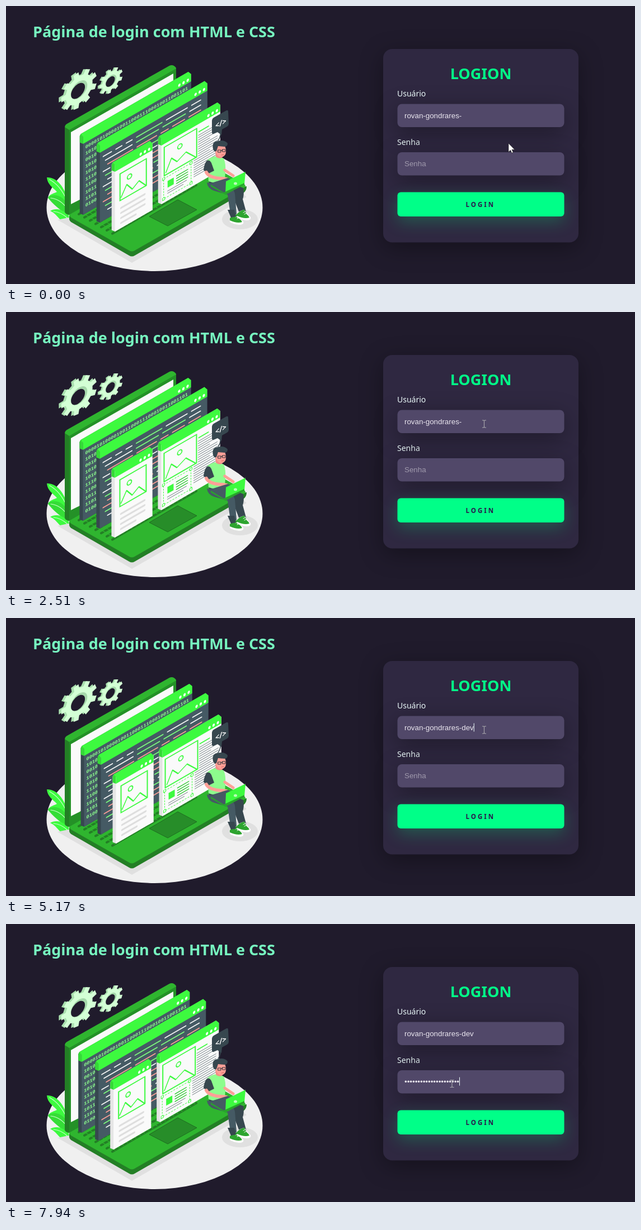
Animation of 1124x498 px, one loop 8000 ms. Source, as an HTML page:

```html
<!DOCTYPE html>
<html lang="pt-BR">
<head>
<meta charset="utf-8">
<title>Login</title>
<style>
html, body { margin: 0; width: 100%; height: 100%; overflow: hidden; background: #201b2c; }
svg { display: block; width: 1124px; height: 498px; }
.noto { font-family: "Noto Sans", sans-serif; }
.h { font-size: 27px; font-weight: 600; }
.label { font-size: 14px; fill: #f0ffff; }
.field { font: 13.333px "Liberation Sans", Arial, sans-serif; fill: #eae6ef; }
.btn { font-size: 11.5px; font-weight: 800; letter-spacing: 3px; fill: #2b134b; }
.bits { font: bold 8.5px "Liberation Mono", monospace; fill: #8dff8d; }
.card { filter: drop-shadow(0 10px 20px #00000056); }
.glow { filter: drop-shadow(0 10px 14px #00ff8038); }
</style>
</head>
<body>
<svg viewBox="0 0 1124 498">
  <rect width="1124" height="498" fill="#201b2c"/>
  <text class="noto h" x="48" y="56" fill="#77f7c0">Página de login com HTML e CSS</text>
  <g id="art"></g>

  <rect class="card" x="674" y="77" width="349" height="346.5" rx="16" fill="#2f2841"/>
  <text class="noto h" x="848.5" y="131" text-anchor="middle" fill="#00ff88">LOGION</text>
  <text class="noto label" x="699" y="162">Usuário</text>
  <text class="noto label" x="699" y="248.500">Senha</text>
  <g fill="#514869">
    <rect class="card" x="699.500" y="175.500" width="298" height="41.500" rx="8"/>
    <rect class="card" x="699.500" y="262" width="298" height="41.500" rx="8"/>
  </g>
  <rect class="glow" x="699.500" y="333.500" width="298" height="43.500" rx="6" fill="#00ff88"/>
  <text class="noto btn" x="821.500" y="359.500">LOGIN</text>
  <text class="field" id="user" x="712" y="201"></text>
  <text class="field" id="pass" x="712" y="287"></text>
  <rect id="caret" width="1" height="15" fill="#f0ffff"/>
  <circle id="click" r="10.5" fill="#b5a832"/>
  <g id="pointer">
    <path id="arrow" d="M0 0V15.500L3.500 12.200L5.800 17.300L8.200 16.200L6 11.200H10.800Z" fill="#fff" stroke="#222" stroke-width=".6"/>
    <path id="beam" d="M-3.500-6.500H-1L0-5.500L1-6.500H3.500M0-5.500V5.500M-3.500 6.500H-1L0 5.500L1 6.500H3.500" fill="none" stroke="#aaa9ae" stroke-width="1.100"/>
  </g>
</svg>
<script>
const $ = id => document.getElementById(id);
const GREEN = '#3dfa3f', MID = '#2fb52f', DEEP = '#237f25', SLATE = '#455a64', INK = '#37474f', SKIN = '#ff9f97';

let seed = 11;
const rand = () => (seed = seed * 16807 % 2147483647) / 2147483647;

const shape = (d, fill, more = '') => `<path d="${d}" fill="${fill}" ${more}/>`;
const line = (d, color, w = 1) => shape(d, 'none', `stroke="${color}" stroke-width="${w}" stroke-linecap="round" stroke-linejoin="round"`);
const iso = (x, y, inner) => `<g transform="matrix(1 -.58 0 1 ${x} ${y})">${inner}</g>`;
const bar = (x, y, w, color, h) => line(`M${x} ${y}h${w}`, color, h);

// Slab seen from the left, with a coloured title bar and three dots.
function pane(x, y, w, h, head, face, side, inner) {
  const slab = (top, tall, color) =>
    shape(`M-6-4.500L-4-7L${w - 5}-7L${w} 0V${top + tall}H0L-6 ${top + tall - 6}Z`, color);
  let dots = '';
  for (let i = 0; i < 3; i++)
    dots += `<ellipse cx="${w - 21 + i * 7.500}" cy="${head / 2 + 1}" rx="2.100" ry="2.600" fill="#fff"/>`;
  return iso(x, y,
    slab(0, h, side) + slab(0, head, '#35d937') +
    shape(`M0 0H${w}V${h}H0Z`, face) +
    shape(`M0 0L-4-7H${w - 5}L${w} 0V${head}H0Z`, GREEN) + dots + inner);
}

function picture(x, y, w, h, cx, hill) {
  return shape(`M${x} ${y}h${w}v${h}h${-w}Z`, 'none', `stroke="${GREEN}" stroke-width="2"`) +
    `<circle cx="${cx}" cy="${y + 14.500}" r="4" fill="none" stroke="${GREEN}" stroke-width="1.800"/>` +
    line(hill, GREEN, 1.800);
}

function gear(x, y, r) {
  const ring = [];
  for (let i = 0; i < 9; i++)
    [[-.27, .76], [-.2, 1], [.2, 1], [.27, .76]].forEach(([a, k]) => {
      const t = (i + a) * Math.PI * 2 / 9 + .35;
      ring.push((Math.cos(t) * r * k).toFixed(1) + ' ' + (Math.sin(t) * r * k).toFixed(1));
    });
  const body = 'M' + ring.join('L') + 'Z';
  return iso(x - r * .06, y, shape(body, '#a9dfae')) + iso(x + r * .08, y,
    shape(body, '#d3ffd5') + `<circle r="${r * .46}" fill="#a5d8aa"/>` +
    `<circle cx="${-r * .06}" cy="${r * .03}" r="${r * .39}" fill="#201b2c"/>`);
}

function bitsPane() {
  let rows = '';
  for (let i = 0; i < 10; i++) {
    let s = '';
    for (let j = 0; j < 36; j++) s += rand() < .5 ? 0 : 1;
    rows += `<text class="bits" x="4" y="${24 + i * 11.600}">${s}</text>`;
  }
  return pane(138, 234, 193, 140, 13, SLATE, '#37474f', rows);
}

function codePane() {
  const tones = ['#f5f5f5', '#7dff7d', SKIN];
  let rows = '';
  for (let i = 0; i < 12; i++) {
    let x = 6 + (i % 3) * 4;
    while (x < 172) {
      const w = 10 + rand() * 38;
      rows += bar(x, 23 + i * 9, Math.min(w, 180 - x), i === 2 || i > 4 && rand() < .5 ? SKIN : tones[rand() * 2 | 0], 2);
      x += w + 8;
    }
  }
  return pane(168, 250, 192, 138, 13, SLATE, '#37474f', rows);
}

function articlePane() {
  let rows = bar(67, 26, 17, GREEN, 2);
  for (let i = 0; i < 18; i++)
    rows += bar(i < 10 ? 66 : 58, 32 + i * 4.100, (i < 10 ? 34 : 42) * (i % 5 === 4 ? .6 : 1), '#6f7b80', 1);
  rows += shape('M4 74H53V110H4Z', 'none', `stroke="${GREEN}" stroke-dasharray="3 2"`);
  [[4, 74], [53, 74], [53, 110], [4, 110]].forEach(([x, y]) =>
    rows += shape(`M${x - 2} ${y - 2}h4v4h-4Z`, '#fff', `stroke="${GREEN}"`));
  rows += shape('M11 82h11v12h-11Z', GREEN);
  for (let i = 0; i < 4; i++) rows += bar(27, 82 + i * 4.500, 20, '#35c937', 1.600);
  rows += bar(11, 100, 34, '#6f7b80', 1) + bar(11, 104, 28, '#6f7b80', 1);
  return pane(278, 238, 105, 117, 12, '#fafafa', '#e3e3e3',
    picture(5, 18, 58, 51, 33, 'M8 65L18 45L28 57L44 49L61 68') + rows);
}

function cardPane() {
  let rows = '';
  for (let i = 0; i < 4; i++) rows += bar(11, 83 + i * 9, i === 3 ? 26 : 42, '#dedede', 3.500);
  return pane(195, 285, 67, 119, 12, '#fafafa', '#e6e6e6',
    picture(9, 21, 47, 48, 26, 'M11 64L21 47L31 61L43 53L55 68') + rows);
}

function laptop() {
  let keys = '';
  for (let i = 0; i < 7; i++) keys += line(`M${130 + i * 10} ${373 + i * 5.800}l150-87`, DEEP, 4);
  for (let i = 0; i < 22; i++) keys += line(`M${130 + i * 7.500} ${367 - i * 4.350}l65 38`, MID, 1.200);
  return shape('M92 383L225 460L430 342L400 320Z', '#e0e0e0') +
    shape('M113 372V382Q114 386 118 388L220 447Q225 450 230 447L424 335Q430 331 430 323Z', DEEP) +
    shape('M113 372Q112 376 118 380L220 438Q225 441 230 438L425 326Q431 322 424 318L318 258Z', MID) +
    keys +
    shape('M256 377L307 347L341 365L289 394Z', '#278d29', 'stroke="#1e6c20"') +
    shape('M105 218Q105 213 109 211L292 107Q299 104 304 111V264L114 374Q105 373 105 368Z', MID) +
    shape('M105 217L113 222V374Q105 373 105 368Z', DEEP) +
    shape('M113 222L304 112V264L113 374Z', '#249127') +
    shape('M116 226L299 121V262L116 355Z', '#fafafa');
}

const plant = () =>
  shape('M113 352C104 324 92 307 73 307C74 320 84 325 91 333C82 337 77 338 75 344C84 353 98 354 110 372L114 374Z', GREEN) +
  shape('M75 343C88 333 105 342 112 360V377C98 366 82 354 75 343Z', '#35dd37') +
  shape('M79 367C91 360 107 366 114 380L110 387C94 387 94 374 79 367Z', GREEN) +
  line('M78 311Q98 322 109 349M80 344Q98 346 110 364M85 368Q99 369 111 381', '#c9ffc9', 1.200);

const bubble = () =>
  line('M383 222Q385 233 379 241', INK, 1.500) +
  shape('M368 205Q368 202 371 200L394 187Q397 186 397 189L398 211Q398 214 395 216L386 221L385 231L378 226L371 229Q368 230 368 226Z', INK) +
  `<text class="noto" font-size="14" font-weight="700" fill="#fff" transform="matrix(.9 -.46 0 1 374 220)">&lt;/&gt;</text>`;

function shoe(x, y) {
  return `<g transform="translate(${x} ${y})">` +
    shape('M-9 0Q-3-5 4-6Q10 3 15 7Q17 13 7 13Q-2 12-9 8Z', '#fff') +
    shape('M-9 1Q-3-5 4-6L8 2Q12 5 13 8Q4 11-9 5Z', '#2da42f') +
    line('M2-1l4-2M4 2l4-2', '#fff') + '</g>';
}

const man = () =>
  `<ellipse cx="418" cy="382" rx="32" ry="18" fill="#e0e0e0"/>` +
  shape('M362 311L396 315L424 326Q426 338 423 346L430 372L419 376L405 340L364 326Z', INK) +
  shape('M359 316Q360 327 372 331L396 338L402 380L413 384L409 336Q408 329 400 326Z', SLATE) +
  shoe(409, 379) + shoe(422, 371) +
  shape('M396 365l6 14l9-2l-3-12Z', INK) +
  shape('M359 277Q367 269 377 269L389 273Q393 282 392 297L391 313Q376 320 362 314Z', '#8dfd8d') +
  shape('M374 260L375 270Q381 275 387 271L387 263Z', '#f48d86') +
  shape('M373 250Q379 246 390 249Q395 258 392 266Q388 272 381 270Q373 264 373 250Z', SKIN) +
  shape('M370 256Q367 243 378 242Q390 239 396 246Q396 252 390 252L379 251L376 260Q372 262 370 256Z', INK) +
  line('M379 258h5v4h-5ZM387 257h5v4h-5ZM384 259l3-1', '#263238', 1) +
  line('M385 267l4-1', '#d9655f', 1) +
  shape('M358 278Q363 274 367 281L372 295L362 300L353 294Q354 284 358 278Z', INK) +
  line('M358 298Q363 308 386 309L394 310', SKIN, 6) +
  line('M391 294L406 304', SKIN, 5) +
  shape('M364 318L393 334L425 320L396 308Z', SLATE) +
  shape('M393 314L428 297L426 319L392 337Z', GREEN) +
  shape('M389 334L426 317L426 320L392 338L366 323L366 320Z', '#28a52b') +
  `<ellipse cx="410" cy="318" rx="3" ry="2.500" fill="#b8ffb8"/>`;

$('art').innerHTML =
  '<ellipse cx="265.500" cy="361" rx="193" ry="114" fill="#f0f0f0"/>' +
  plant() + laptop() + gear(128, 150, 32) + gear(186, 134, 21) +
  `<g id="panes">${bitsPane()}${codePane()}${articlePane()}${cardPane()}</g>` +
  bubble() + man();

const LOOP = 8000;
const SHAKE = [0, -1, 2, -4, 4, -4, 4, -4, 2, -1, 0];
const PATH = [ // ms, x, y
  [0, 898, 246], [250, 897, 245], [560, 884, 226], [800, 876, 211], [1160, 867, 208],
  [1600, 852, 204], [1900, 852, 204], [2500, 854.5, 200.5], [5250, 854.5, 200.5],
  [5480, 855, 212], [5840, 761, 260], [5950, 741, 285], [6140, 738, 289],
  [6720, 745, 288], [7300, 797, 286], [8000, 797, 286]
];
const NAME = 'rovan-gondrares-';
const KEYS = [4300, 4520, 4750];
const FOCUS = [1850, 5950];
const DOTS = 21, TYPE_FROM = 6500, TYPE_TO = 7900;

function along(t) {
  const i = PATH.findIndex(p => p[0] > t);
  const [a, x, y] = PATH[i - 1], [b, u, v] = PATH[i], k = (t - a) / (b - a);
  return [x + (u - x) * k, y + (v - y) * k];
}

const show = (id, on) => $(id).setAttribute('visibility', on ? 'visible' : 'hidden');
const setText = (el, s) => { if (el.textContent !== s) el.textContent = s; };

function draw(t) {
  const s = (t / 3060 + .125) % 1 * 10, i = s | 0;
  $('panes').setAttribute('transform', `translate(${SHAKE[i] + (SHAKE[i + 1] - SHAKE[i]) * (s - i)} 0)`);

  const typed = KEYS.filter(k => t >= k).length;
  const user = $('user'), pass = $('pass');
  setText(user, NAME + 'dev'.slice(0, typed));
  const n = Math.max(0, Math.min(DOTS, Math.floor((t - TYPE_FROM) / (TYPE_TO - TYPE_FROM) * DOTS)));
  setText(pass, n ? '•'.repeat(n) : 'Senha');
  pass.style.fill = n ? '#eae6ef' : '#a09aad';

  const second = t >= FOCUS[1];
  const since = second ? (n ? 0 : t - FOCUS[1]) : t - (typed ? KEYS[typed - 1] : FOCUS[0]);
  show('caret', t >= FOCUS[0] && since % 1000 < 500);
  $('caret').setAttribute('x', second ? 712 + (n ? pass.getComputedTextLength() : 0) : 712 + user.getComputedTextLength());
  $('caret').setAttribute('y', second ? 274.5 : 188.5);

  const [x, y] = along(t);
  const arrow = t < 720 || t > 5560 && t < 5880;
  const press = t >= 1740 && t < 1910 || t >= 5950 && t < 6080;
  $('pointer').setAttribute('transform', `translate(${x} ${y})`);
  show('arrow', arrow);
  show('beam', !arrow && !press);
  show('click', press);
  $('click').setAttribute('cx', x);
  $('click').setAttribute('cy', y);
}

const start = performance.now();
function tick() {
  draw((performance.now() - start) % LOOP);
  requestAnimationFrame(tick);
}
draw(0);
requestAnimationFrame(tick);
</script>
</body>
</html>
```
